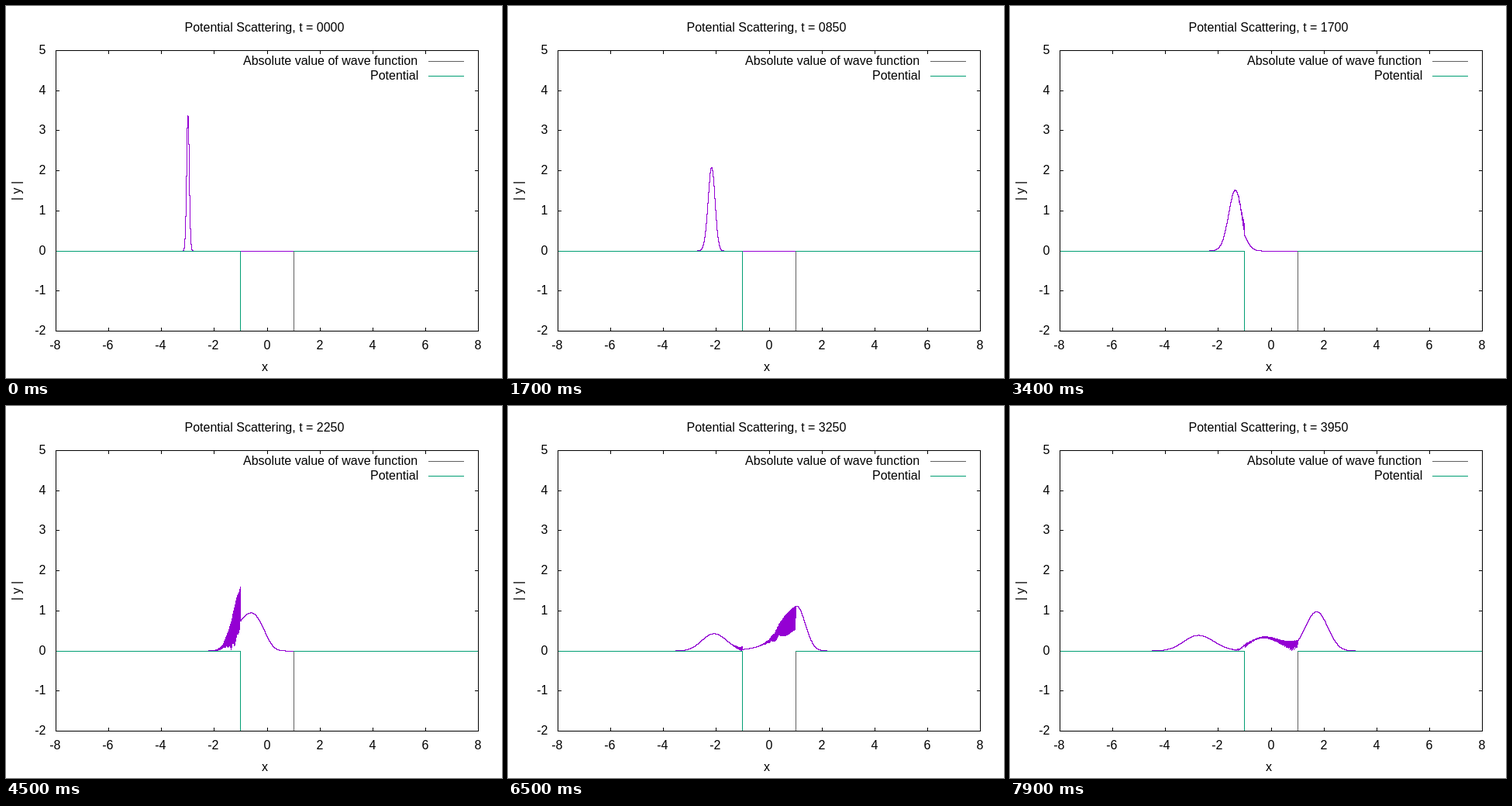
An HTML page with a canvas for the animation above (8 s loop, 640x480 px).

```html
<!DOCTYPE html>
<html lang="en">
<head>
<meta charset="utf-8">
<title>Potential Scattering</title>
<style>
  html, body { margin: 0; width: 100%; height: 100%; overflow: hidden; background: #fff; }
  canvas, svg { position: absolute; left: 0; top: 0; width: 640px; height: 480px; }
  text { font: 16px "Liberation Sans", Arial, sans-serif; font-kerning: none; white-space: pre; }
</style>
</head>
<body>
<canvas id="plot" width="640" height="480"></canvas>
<svg id="labels" viewBox="0 0 640 480">
  <text id="title" x="230.5" y="33">Potential Scattering, t = 0000</text>
  <text x="306" y="76">Absolute value of wave function</text>
  <text x="470" y="95">Potential</text>
  <text x="334" y="471" text-anchor="middle">x</text>
  <text transform="translate(19 238.5) rotate(-90)" text-anchor="middle">| y |</text>
</svg>
<script>
const PURPLE = '#9400d3', GREEN = '#009e73', GREY = '#606060', BLACK = '#000';
const BOX = { left: 64, right: 609, top: 57, bottom: 419 };
const FRAMES = 80, FRAME_MS = 100, STEPS = 50;

const px = x => Math.round(BOX.left + (x + 8) * (BOX.right - BOX.left) / 16);
const py = y => Math.round(BOX.top + (5 - y) * (BOX.bottom - BOX.top) / 7);

// Schrödinger equation on a grid, time step = grid step squared / 2
const N = 4000, DX = 16 / N;
const WAVE = { center: -3, width: 0.0495, k: 40 * Math.PI };
const DEPTH = 0.1895; // well depth times time step

function simulate() {
  const re = new Float64Array(N + 1), im = new Float64Array(N + 1);
  const diag = new Float64Array(N + 1);
  const peak = (Math.PI * WAVE.width ** 2) ** -0.25;
  for (let j = 0; j <= N; j++) {
    const x = -8 + j * DX, d = x - WAVE.center;
    const a = peak * Math.exp(-d * d / (2 * WAVE.width ** 2));
    re[j] = a * Math.cos(WAVE.k * d);
    im[j] = a * Math.sin(WAVE.k * d);
    diag[j] = 0.5 - (Math.abs(x) < 1 + DX / 2 ? DEPTH : 0);
  }
  const push = (to, from, s) => {
    for (let j = 1; j < N; j++) {
      to[j] += s * (diag[j] * from[j] - 0.25 * (from[j - 1] + from[j + 1]));
    }
  };
  // the imaginary part runs half a step ahead between frames
  const frames = [];
  for (let f = 0; f < FRAMES; f++) {
    frames.push(Float32Array.from(re, (r, j) => Math.hypot(r, im[j])));
    push(im, re, -0.5);
    for (let n = 1; n <= STEPS; n++) {
      push(re, im, 1);
      push(im, re, n < STEPS ? -1 : -0.5);
    }
  }
  return frames;
}

const ctx = document.getElementById('plot').getContext('2d');
const title = document.getElementById('title');
const labels = document.getElementById('labels');

// One-pixel line, both ends included
function line(color, x0, y0, x1, y1) {
  ctx.fillStyle = color;
  ctx.fillRect(Math.min(x0, x1), Math.min(y0, y1), Math.abs(x1 - x0) + 1, Math.abs(y1 - y0) + 1);
}

function addLabel(value, x, y, anchor) {
  const el = document.createElementNS(labels.namespaceURI, 'text');
  el.setAttribute('x', x);
  el.setAttribute('y', y);
  el.setAttribute('text-anchor', anchor);
  el.textContent = value;
  labels.append(el);
}

function drawTicks() {
  const { left, right, top, bottom } = BOX;
  for (let x = -8; x <= 8; x += 2) {
    line(BLACK, px(x), top, px(x), top + 4);
    line(BLACK, px(x), bottom - 4, px(x), bottom);
  }
  for (let y = -2; y <= 5; y++) {
    line(BLACK, left, py(y), left + 4, py(y));
    line(BLACK, right - 4, py(y), right, py(y));
  }
}

function drawWave(values) {
  let x0 = px(-8), y0 = py(values[0]);
  for (let j = 1; j <= N; j++) {
    const x1 = px(-8 + j * DX), y1 = py(values[j]);
    if (x1 === x0) {
      line(PURPLE, x0, y0, x0, y1);
    } else {
      const mid = (y0 + y1) >> 1;
      line(PURPLE, x0, y0, x0, mid);
      line(PURPLE, x1, mid, x1, y1);
    }
    x0 = x1;
    y0 = y1;
  }
}

function drawPotential() {
  const { left, right, bottom } = BOX, zero = py(0);
  line(GREEN, left, zero, px(-1), zero);
  line(GREEN, px(-1), zero, px(-1), bottom);
  line(GREY, px(1), zero, px(1), bottom);
  line(GREEN, px(1), zero, right, zero);
}

function drawBorder() {
  const { left, right, top, bottom } = BOX;
  line(BLACK, left, top, right, top);
  line(BLACK, left, bottom, right, bottom);
  line(BLACK, left, top, left, bottom);
  line(BLACK, right, top, right, bottom);
}

function draw(index) {
  ctx.fillStyle = '#fff';
  ctx.fillRect(0, 0, 640, 480);
  drawTicks();
  drawWave(waves[index]);
  drawPotential();
  drawBorder();
  line(GREY, 545, 71, 590, 71);
  line(GREEN, 545, 90, 590, 90);
  title.textContent = 'Potential Scattering, t = ' + String(index * STEPS).padStart(4, '0');
}

for (let x = -8; x <= 8; x += 2) addLabel(x, px(x) - (x < 0 ? 0.7 : 0), 443, 'middle');
for (let y = -2; y <= 5; y++) addLabel(y, 51.5, py(y) + 5, 'end');

const waves = simulate();
const start = performance.now();
let shown = -1;

function tick() {
  const index = Math.floor((performance.now() - start) / FRAME_MS) % FRAMES;
  if (index !== shown) draw(shown = index);
  requestAnimationFrame(tick);
}
tick();
</script>
</body>
</html>
```
